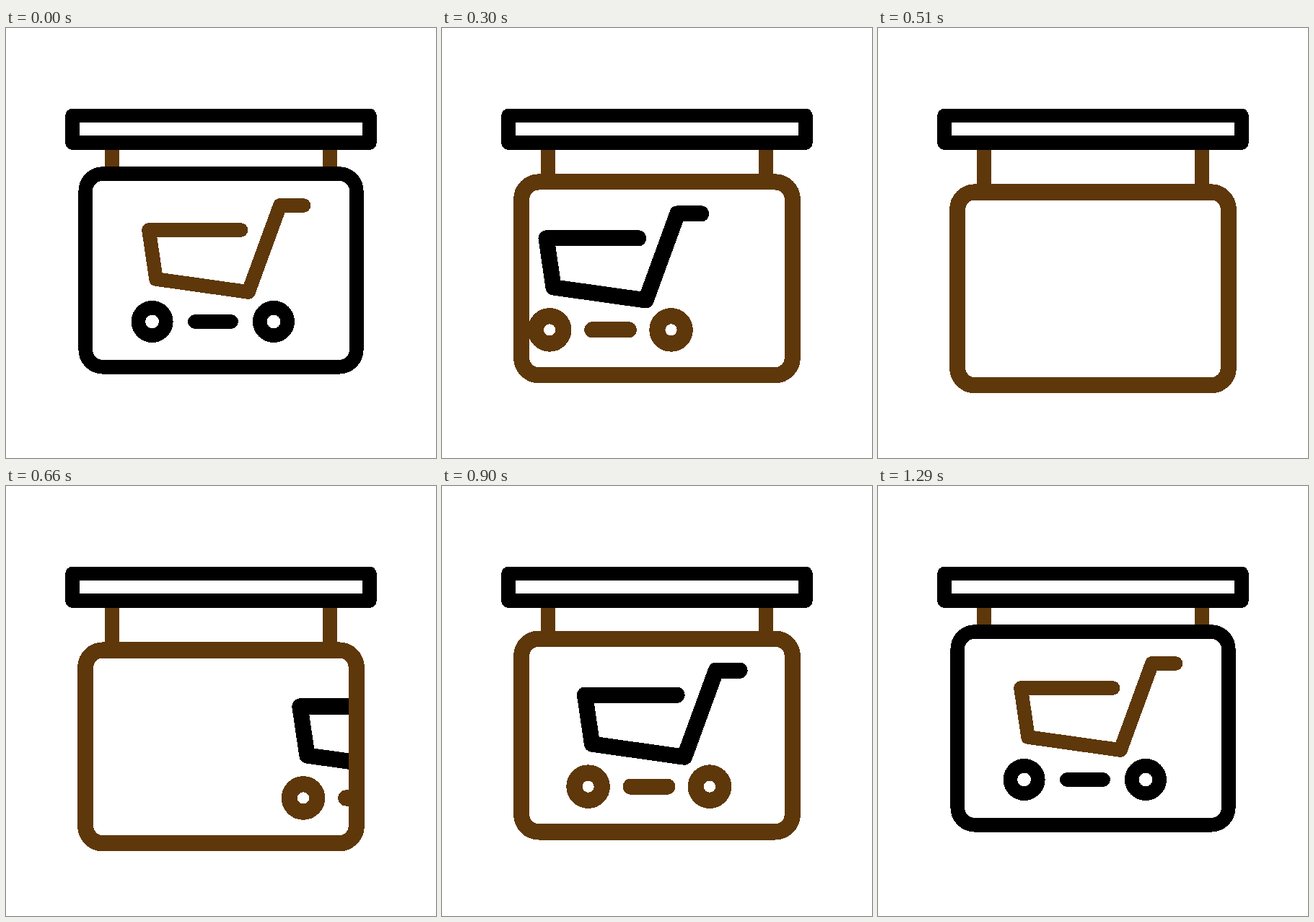
These frames come from a looping animation (596x596 px, 1620 ms). An HTML page:

```html
<!DOCTYPE html>
<html lang="en">
<head>
<meta charset="utf-8">
<title>Shop sign</title>
<style>
  html, body { margin: 0; width: 100%; height: 100%; overflow: hidden; background: #fff; }
  svg { display: block; width: 100%; height: 100%; }
</style>
</head>
<body>
<svg viewBox="0 0 596 596" fill="none" stroke-linecap="round" stroke-linejoin="round" shape-rendering="crispEdges">
  <defs>
    <clipPath id="window"><rect x="112" y="204" width="372" height="264"/></clipPath>
  </defs>
  <path d="M147 160V220M449 160V220" id="hangers" stroke="#5e380a" stroke-width="20" stroke-linecap="butt"/>
  <rect x="92" y="121.6" width="412" height="37.4" stroke="#000" stroke-width="19.6"/>
  <g id="sign">
    <g clip-path="url(#window)">
      <g id="goods">
        <path id="cart" d="M412.5 246H379.8L336 366L208 348L198 280H325.5"/>
        <g id="wheels">
          <circle cx="202.6" cy="407" r="19.2"/>
          <circle cx="371" cy="407" r="19.2"/>
          <path d="M261.8 407H312.2"/>
        </g>
      </g>
    </g>
    <rect id="frame" x="110.2" y="202" width="375.6" height="267.8" rx="24"/>
  </g>
</svg>
<script>
const LOOP = 1620, STEP = 30;
const DROP = 26.2, TRAVEL = 800;
const BLACK = '#000', BROWN = '#5e380a';
const el = id => document.getElementById(id);
const hangers = el('hangers'), sign = el('sign'), goods = el('goods');
const cart = el('cart'), wheels = el('wheels'), frame = el('frame');

const span = (t, a, b) => Math.min(1, Math.max(0, (t - a) / (b - a)));
const smooth = u => u * u * (3 - 2 * u);

// cubic-bezier(.5, 0, .5, 1), solved by bisection
function ease(x) {
  let lo = 0, hi = 1;
  for (let i = 0; i < 24; i++) {
    const s = (lo + hi) / 2;
    if (1.5 * s * (1 - s) + s * s * s < x) lo = s; else hi = s;
  }
  return smooth((lo + hi) / 2);
}

function style(node, color, bold) {
  node.setAttribute('stroke', color);
  node.setAttribute('stroke-width', bold ? 22.2 : 19.6);
}

function draw(t) {
  const dy = DROP * (t < 585 ? ease(span(t, 50, 585)) : ease(1 - span(t, 585, 1140)));
  const slide = TRAVEL * smooth(span(t, 188, 898));
  const dx = slide < TRAVEL / 2 ? -slide : TRAVEL - slide;
  const frameOn = t >= 300 && t < 1110;
  const goodsOn = t >= 300 && t < 1290;

  sign.setAttribute('transform', `translate(0 ${dy.toFixed(3)})`);
  goods.setAttribute('transform', `translate(${dx.toFixed(3)} 0)`);
  hangers.setAttribute('d', `M147 160V${202 + dy}M449 160V${202 + dy}`);
  style(frame, frameOn ? BROWN : BLACK, frameOn);
  style(cart, goodsOn ? BLACK : BROWN, goodsOn);
  style(wheels, goodsOn ? BROWN : BLACK, goodsOn);
}

function tick() {
  const t = performance.now() % LOOP;
  draw(Math.floor(t / STEP) * STEP);
  requestAnimationFrame(tick);
}
tick();
</script>
</body>
</html>
```
